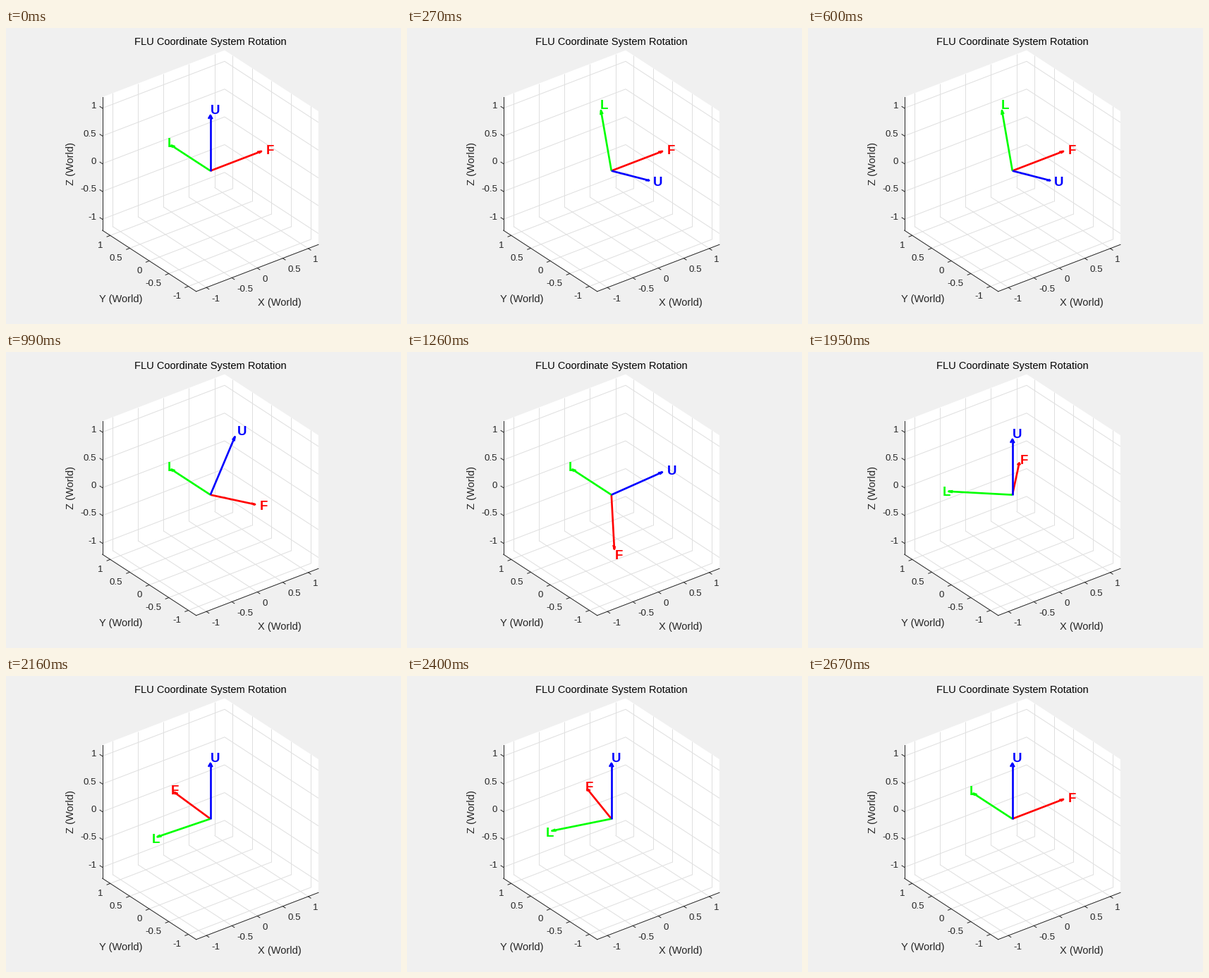
A matplotlib script for the animation above (2.7 s loop, 560x420 px).

```python
import numpy as np
import matplotlib.pyplot as plt
from matplotlib.animation import FuncAnimation

W, H, DPI = 560, 420, 100
PT = 72 / DPI                      # points per pixel
FRAMES, PHASE, INTERVAL = 90, 30, 30
LIM = 1.2
TICKS = (-1, -0.5, 0, 0.5, 1)
INK = "#262626"
EPS = np.finfo(float).eps
HEAD_LEN, HEAD_SPREAD = 0.066, 0.33

# Orthographic view onto the cube
CENTER = np.array([289.8, 202.65])
SCALE = 91.0
AZ, EL = np.radians([37.5, 30])
BASIS = SCALE * np.array([
    [np.cos(AZ), -np.sin(AZ) * np.sin(EL)],
    [-np.sin(AZ), -np.cos(AZ) * np.sin(EL)],
    [0, -np.cos(EL)],
])

plt.rcParams["font.family"] = "Liberation Sans"
fig = plt.figure(figsize=(W / DPI, H / DPI), dpi=DPI, facecolor="#f0f0f0")
ax = fig.add_axes([0, 0, 1, 1])
ax.set_xlim(0, W)
ax.set_ylim(H, 0)
ax.axis("off")


def project(points):
    return CENTER + np.asarray(points, float) @ BASIS


def line(points, color, width=1.0, **kw):
    xy = project(points)
    return ax.plot(xy[:, 0], xy[:, 1], color=color, lw=width * PT, **kw)[0]


def label(x, y, s, px, color=INK, ha="center", **kw):
    """Text whose line is vertically centred on y."""
    return ax.text(x, y + 0.3465 * px, s, fontsize=px * PT, color=color,
                   ha=ha, va="baseline", **kw)


def draw_box():
    a = LIM
    outline = project([(-a, a, -a), (-a, a, a), (a, a, a),
                       (a, -a, a), (a, -a, -a), (-a, -a, -a)])
    ax.fill(outline[:, 0], outline[:, 1], color="white", lw=0, zorder=0)

    for t in TICKS:
        for path in ([(t, -a, -a), (t, a, -a)], [(t, a, -a), (t, a, a)],
                     [(-a, t, -a), (a, t, -a)], [(a, t, -a), (a, t, a)],
                     [(-a, a, t), (a, a, t)], [(a, -a, t), (a, a, t)]):
            line(path, "#dfdfdf", zorder=1, solid_capstyle="butt")

    line([(-a, a, a), (-a, a, -a)], INK, zorder=2)
    line([(-a, a, -a), (-a, -a, -a)], INK, zorder=2)
    line([(-a, -a, -a), (a, -a, -a)], INK, zorder=2)

    # per axis: tick position, outward direction, label offset, alignment
    size = 0.065
    axes = (
        (lambda t: (t, -a, -a), (0, -size, 0), (6.9, 15), "left"),
        (lambda t: (-a, t, -a), (-size, 0, 0), (-10, 13), "right"),
        (lambda t: (-a, a, t), (0, size, 0), (-8.4, -4.2), "right"),
    )
    for place, out, (dx, dy), ha in axes:
        for t in TICKS:
            p = np.array(place(t))
            line([p, p + out], INK, zorder=2)
            x, y = project(p)
            label(x + dx, y + dy, f"{t:g}", 40 / 3, ha=ha)

    px = 44 / 3
    label(388.3, 389.3, "X (World)", px)
    label(162.3, 384.3, "Y (World)", px)
    ax.text(96, 192.5, "Z (World)", fontsize=px * PT, color=INK, rotation=90,
            rotation_mode="anchor", ha="center", va="baseline")
    label(289.8, 19.3, "FLU Coordinate System Rotation", px, "black")


def head(v):
    """Arrow head lying across the horizontal part of v."""
    spread = HEAD_SPREAD * np.linalg.norm(v) / (np.hypot(v[0], v[1]) + EPS)
    side = spread * np.array([v[1] + EPS, -(v[0] + EPS), 0])
    return [v - HEAD_LEN * (v + side), v, v - HEAD_LEN * (v - side)]


class Arrow:
    LABEL_PX = 56 / 3

    def __init__(self, name, color, z):
        style = dict(zorder=z, solid_joinstyle="round", solid_capstyle="butt")
        self.shaft = line([(0, 0, 0)] * 2, color, 2.67, **style)
        self.head = line([(0, 0, 0)] * 3, color, 2.67, **style)
        self.text = label(0, 0, name, self.LABEL_PX, color, ha="left",
                          weight="bold", zorder=z + 5)

    def point(self, v):
        self.shaft.set_data(*project([np.zeros(3), v]).T)
        self.head.set_data(*project(head(v)).T)
        x, y = project(1.1 * v)
        self.text.set_position((x, y + 0.3465 * self.LABEL_PX))


def rotation(axis, angle):
    c, s = np.cos(angle), np.sin(angle)
    i, j = (axis + 1) % 3, (axis + 2) % 3
    m = np.eye(3)
    m[i, i] = m[j, j] = c
    m[i, j], m[j, i] = -s, s
    return m


draw_box()
arrows = [Arrow("F", "#ff0000", 3), Arrow("L", "#00ff00", 4),
          Arrow("U", "#0000ff", 5)]


def update(i):
    # roll, pitch, yaw in turn: out to 90 degrees and back
    axis, k = divmod(i, PHASE)
    angle = np.pi / 2 * np.sin(np.pi * k / (PHASE - 1))
    m = rotation(axis, angle)
    for n, arrow in enumerate(arrows):
        arrow.point(m[:, n])
    return []


anim = FuncAnimation(fig, update, frames=FRAMES, interval=INTERVAL,
                     repeat=True, repeat_delay=0, blit=False)
plt.show()
```
